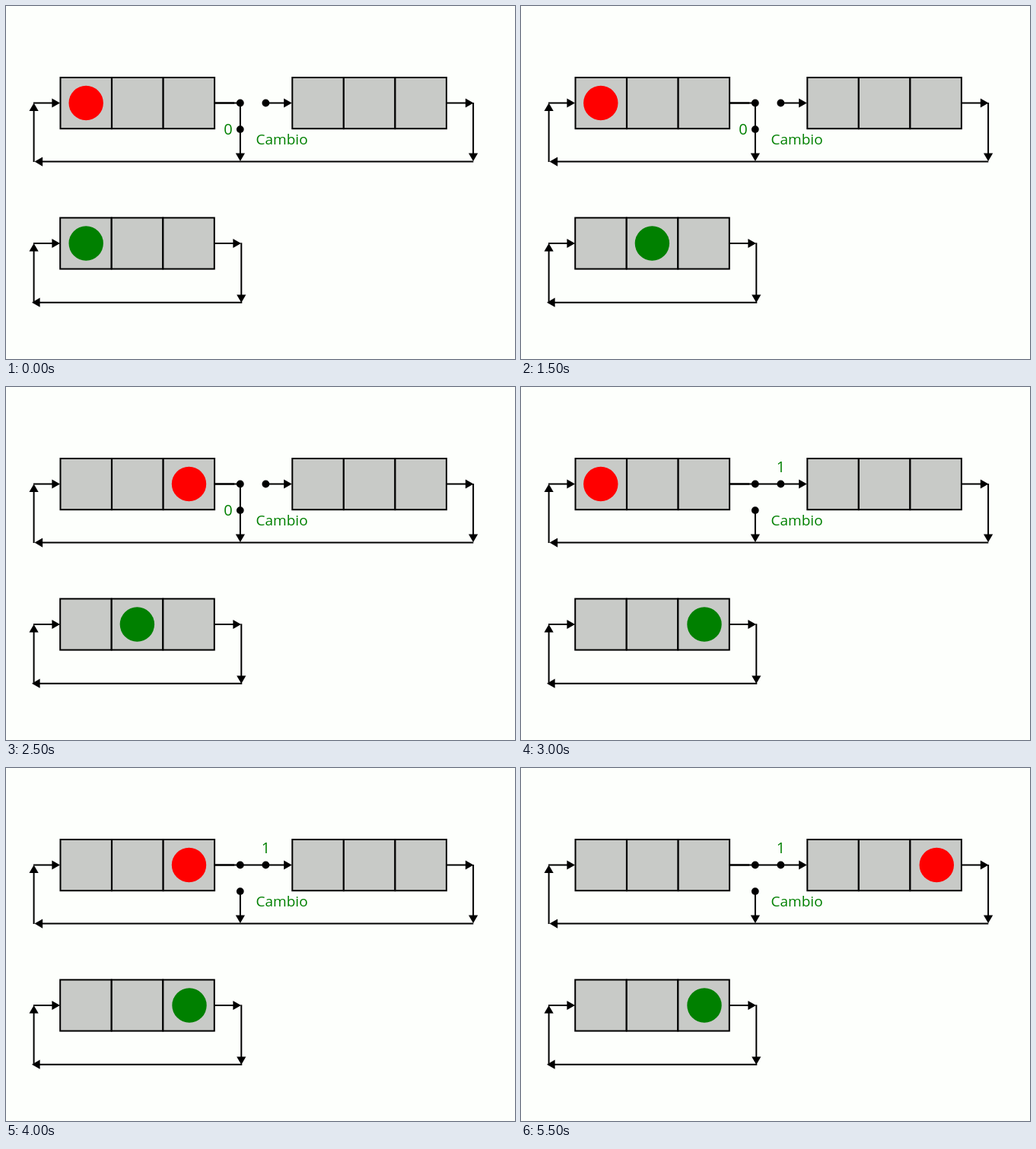
An HTML page with a canvas for the animation above (6000 ms loop, 669x464 px).

```html
<!DOCTYPE html>
<html lang="es">
<head>
<meta charset="utf-8">
<title>Cambio</title>
<style>
  html, body { margin: 0; width: 100%; height: 100%; overflow: hidden; background: #fdfffc; }
  canvas { display: block; width: 669px; height: 464px; }
</style>
</head>
<body>
<canvas id="stage" width="669" height="464"></canvas>
<script>
const ctx = document.getElementById('stage').getContext('2d');
const STEP = 500;
const RED_X = [105.2, 172.8, 240.5, 104.8, 172.8, 240.5, 104.8, 176, 240.5, 411, 478.3, 546.3];
const GREEN_X = [105.2, 172.4, 241];
const GREEN_AT = [0, 3, 6];

function line(x1, y1, x2, y2, width = 2) {
  ctx.lineWidth = width;
  ctx.beginPath();
  ctx.moveTo(x1, y1);
  ctx.lineTo(x2, y2);
  ctx.stroke();
}

function arrow(x1, y1, x2, y2) {
  const len = Math.hypot(x2 - x1, y2 - y1);
  ctx.save();
  ctx.translate(x2, y2);
  ctx.rotate(Math.atan2(y2 - y1, x2 - x1));
  line(-len, 0, -9, 0);
  ctx.beginPath();
  ctx.moveTo(0, 0);
  ctx.lineTo(-10.6, -6.1);
  ctx.lineTo(-10.6, 6.1);
  ctx.fill();
  ctx.restore();
}

function disc(x, y, r, color) {
  ctx.fillStyle = color;
  ctx.beginPath();
  ctx.arc(x, y, r, 0, Math.PI * 2);
  ctx.fill();
}

function register(x, y) {
  ctx.lineWidth = 2;
  for (let i = 0; i < 3; i++) {
    ctx.fillStyle = '#c8cac7';
    ctx.fillRect(x + i * 67.6, y, 67.4, 67.2);
    ctx.strokeRect(x + i * 67.6, y, 67.4, 67.2);
  }
  ctx.fillStyle = '#000';
}

function label(text, x, y) {
  ctx.fillStyle = '#008000';
  ctx.fillText(text, x, y);
}

function draw(step) {
  const closed = step >= 6;
  ctx.fillStyle = '#fdfffc';
  ctx.fillRect(0, 0, 669, 464);
  ctx.strokeStyle = ctx.fillStyle = '#000';

  // upper loop
  register(71.5, 94);
  register(376.3, 94);
  arrow(36, 127.5, 71, 127.5);
  arrow(36.6, 205, 36.6, 127.5);
  arrow(614.3, 204.6, 37.5, 204.6);
  arrow(579, 127.5, 614.5, 127.5);
  arrow(614.1, 127, 614.1, 204);
  line(274, 127.5, 300, 127.5, 2.6);
  line(300, 127.5, closed ? 341.5 : 308, 127.5);
  arrow(341.5, 127.5, 375.8, 127.5);
  arrow(307.9, closed ? 162 : 127.5, 307.9, 204);
  disc(307.8, 127.5, 4.9, '#000');
  disc(341.4, 127.5, 4.9, '#000');
  disc(307.8, 162.1, 4.9, '#000');

  // lower loop
  register(71.2, 278.4);
  arrow(36, 312, 71, 312);
  arrow(36.6, 390, 36.6, 312);
  arrow(310.3, 389.7, 34, 389.7);
  arrow(274.5, 312, 309, 312);
  arrow(309.3, 311.3, 309.3, 390);

  disc(RED_X[step], 127.5, 22.7, '#f00');
  const green = GREEN_AT.filter(s => s <= step).length - 1;
  disc(GREEN_X[green], 312, 22.7, '#008000');

  ctx.font = '19px "Open Sans", "Noto Sans", sans-serif';
  label('Cambio', 328.5, 182);
  ctx.font = '20px "Open Sans", "Noto Sans", sans-serif';
  if (closed) label('1', 335.8, 111.6);
  else if (step !== 4) label('0', 286.2, 168.5);
}

function frame() {
  draw(Math.floor(performance.now() / STEP) % RED_X.length);
  requestAnimationFrame(frame);
}
frame();
</script>
</body>
</html>
```
